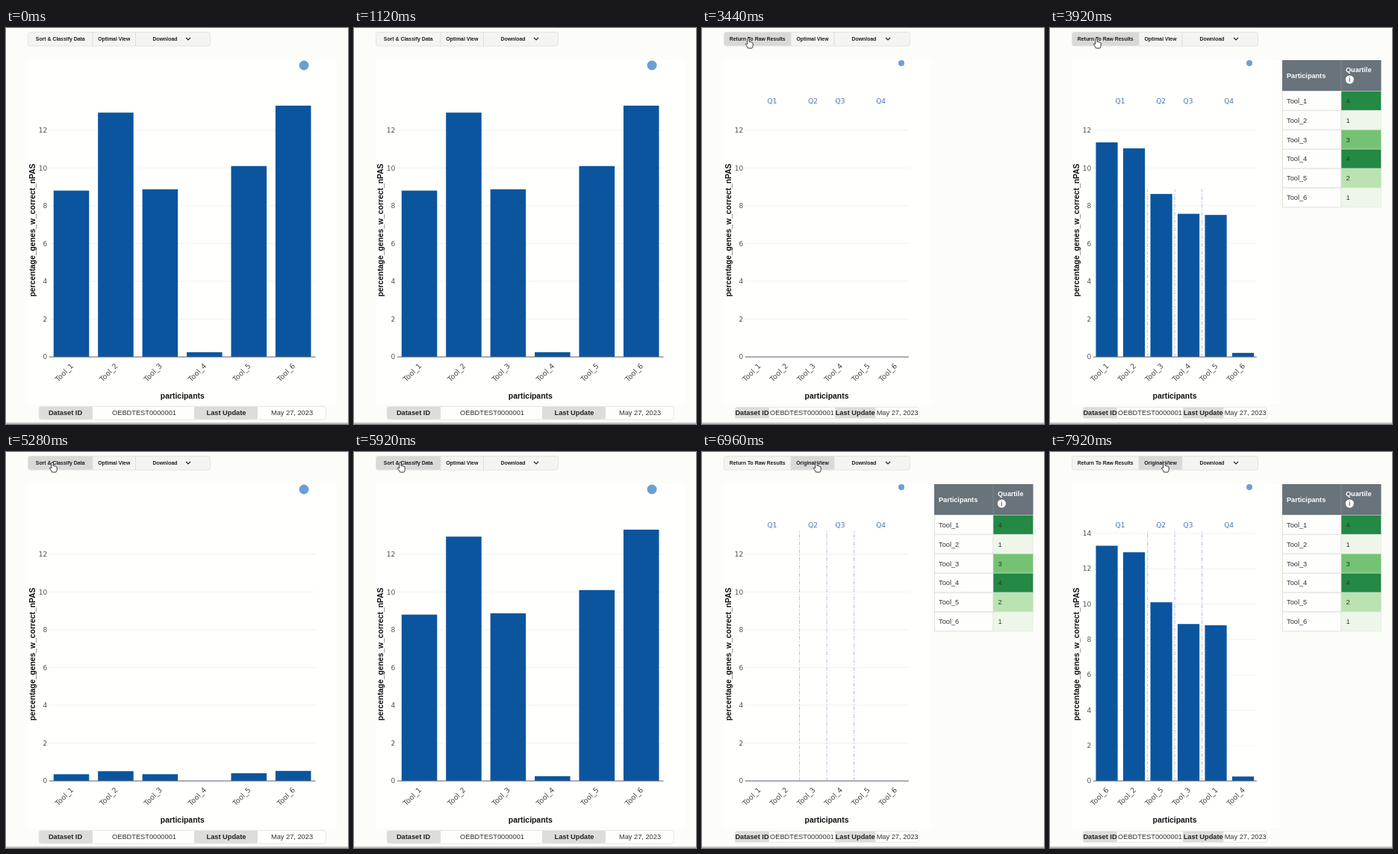
Recreate the animation shown at these times as an HTML page. Size 458 by 530 pixels, loop 8 s.

```html
<!DOCTYPE html>
<html lang="en">
<head>
<meta charset="utf-8">
<title>Benchmark bar plot</title>
<style>
  html, body { margin: 0; width: 100%; height: 100%; overflow: hidden; background: #fcfdf8; }
  svg { display: block; width: 458px; height: 530px; font-family: "Liberation Sans", Arial, sans-serif; }
  .b { font-weight: bold; }
  .m { text-anchor: middle; }
  .plot { font-family: "DejaVu Sans", Verdana, sans-serif; }
</style>
</head>
<body>
<svg id="stage" viewBox="0 0 458 530"></svg>
<script>
const stage = document.getElementById('stage');
const LOOP = 8000, GROW = 500, BASE = 440;
const values = [8.8, 12.93, 8.87, 0.24, 10.1, 13.3];
const quartiles = [4, 1, 3, 4, 2, 1];
const inOrder = [0, 1, 2, 3, 4, 5];
const ranked = [5, 1, 4, 2, 0, 3];
const shades = { 1: '#edf6e8', 2: '#bae3b1', 3: '#74c374', 4: '#238944' };

// Each view: when it is laid out, when its bars start growing.
const views = [
  { at: 0, grow: -GROW, sorted: false },
  { at: 3440, grow: 3587, sorted: true, linesGrow: true },
  { at: 5120, grow: 5174, sorted: false },
  { at: 6000, grow: 6140, sorted: true, linesGrow: true },
  { at: 6900, grow: 6985, sorted: true, optimal: true }
];
const TABLE_DELAY = 80;

const clamp = x => Math.max(0, Math.min(1, x));
const lerp = (a, b, p) => a + (b - a) * p;
const cubicInOut = p => p < .5 ? 4 * p ** 3 : 1 - 4 * (1 - p) ** 3;

const rect = (x, y, w, h, fill, extra = '') =>
  `<rect x="${x}" y="${y}" width="${w}" height="${h}" fill="${fill}" ${extra}/>`;
const line = (x1, y1, x2, y2, color, extra = '') =>
  `<path d="M${x1} ${y1}L${x2} ${y2}" stroke="${color}" fill="none" ${extra}/>`;
const text = (x, y, s, size, cls = '', fill = '#222', extra = '') =>
  `<text x="${x}" y="${y}" font-size="${size}" class="${cls}" fill="${fill}" ${extra}>${s}</text>`;

function toolbar(view, hover) {
  const [a, b, end] = view.sorted ? [119, 177, 279] : [116, 173.5, 274];
  const label = (x, s) => text(x, 17, s, 6.9, 'b m', '#1c1c1c');
  const cx = end - 30;
  let out = rect(29.5, 5.5, end - 30, 18.5, '#f4f4f3', 'rx="3"');
  if (hover === 1) out += rect(29.5, 5.5, a - 29.5, 18.5, '#d9d9d8', 'rx="3"');
  if (hover === 2) out += rect(a, 5.5, b - a, 18.5, '#d9d9d8');
  out += rect(29.5, 5.5, end - 30, 18.5, 'none', 'rx="3" stroke="#e4e4e2"');
  out += line(a, 6, a, 24, '#dededc') + line(b, 6, b, 24, '#dededc');
  out += label((29.5 + a) / 2, view.sorted ? 'Return To Raw Results' : 'Sort &amp; Classify Data');
  out += label((a + b) / 2, view.optimal ? 'Original View' : 'Optimal View');
  out += label(view.sorted ? 217 : 213, 'Download');
  return out + `<path d="M${cx - 3} 13l3 3 3-3" fill="none" stroke="#222" stroke-width="1.2"/>`;
}

function chart(view, t) {
  const p = clamp((t - view.grow) / GROW), done = p === 1;
  const left = 57.8, step = view.sorted ? 36.5 : 59.43, right = left + step * 6;
  const unit = view.optimal && done ? 23.65 : 25.27;
  const topTick = view.optimal && done ? 14 : 12;
  const slots = view.sorted ? ranked : inOrder;
  const names = done ? slots : inOrder;
  let out = rect(29, 43, view.sorted ? 278 : 414, 460, '#fffffe');

  out += '<g class="plot">';
  for (let v = 0; v <= topTick; v += 2) {
    const y = BASE - v * unit;
    if (v) out += line(left, y, right, y, '#f0f0f0');
    out += text(55.3, y + 3.2, v, 9, '', '#505050', 'text-anchor="end"');
  }
  slots.forEach((tool, i) => {
    const h = values[tool] * unit * cubicInOut(p);
    const mid = left + step * (i + .5);
    if (h > .4) out += rect(mid - step * .4, BASE - h, step * .8, h, '#0b559f');
    out += text(0, 0, 'Tool_' + (names[i] + 1), 9.6, '', '#454545',
      `text-anchor="end" transform="translate(${mid + 3.2} 453) rotate(-45)"`);
  });
  out += line(left, BASE + .2, right, BASE + .2, '#5c6068');

  if (view.sorted) {
    const top = lerp(BASE, 104, view.linesGrow ? p : 1);
    for (const n of [2, 3, 4]) {
      const x = left + step * n - .2;
      if (top < BASE) out += line(x, BASE, x, top, '#b3c0e0', 'stroke-dasharray="5 2 1.5 2"');
    }
    [94, 148.7, 185, 239.7].forEach((x, i) => {
      out += text(x, 101, 'Q' + (i + 1), 9, 'm', '#4a75b2');
    });
  }
  out += '</g>';

  out += text(0, 0, 'percentage_genes_w_correct_nPAS', 10.35, 'b m', '#111',
    'transform="translate(38.5 270.5) rotate(-90)"');
  out += text(view.sorted ? 167 : 236.3, 496, 'participants', 10.4, 'b m', '#111');
  const [lx, ly, r] = view.sorted ? [267, 47, 4] : [399, 50, 6.5];
  return out + `<circle cx="${lx}" cy="${ly}" r="${r}" fill="#6ba0d2"/>`;
}

function footer(sorted) {
  const size = 9.25, y = sorted ? 517.7 : 518;
  const cells = sorted
    ? [[44, 46, 67], [178, 54.5, 205.2], 134, 261.7, 247, 507.5, 15]
    : [[44, 72, 79.5], [252, 85, 295], 185, 383, 384.5, 506.5, 17.5];
  const [id, date, idValue, dateValue, width, top, height] = cells;
  let out = rect(44, top, width, height, '#fefefd', 'rx="4"');
  for (const [x, w] of [id, date]) out += rect(x, top, w, height, '#dcddda', 'rx="2"');
  out += rect(44, top, width, height, 'none', 'rx="4" stroke="#e8e9e5"');
  return out + text(id[2], y, 'Dataset ID', size, 'b m') + text(date[2], y, 'Last Update', size, 'b m')
    + text(idValue, y, 'OEBDTEST0000001', size, 'm', '#333')
    + text(dateValue, y, 'May 27, 2023', size, 'm', '#333');
}

function table() {
  let out = rect(311, 43, 132.5, 41.5, '#68737b');
  out += line(390, 43, 390, 84, '#7d878d');
  out += text(317, 67, 'Participants', 9.15, 'b', '#fff') + text(396, 59, 'Quartile', 9.15, 'b', '#fff');
  out += '<circle cx="401.3" cy="69" r="5.6" fill="#fff"/>' + text(401.3, 72.4, 'i', 9, 'b m', '#68737b');
  quartiles.forEach((q, i) => {
    const y = 84.5 + i * 25.9;
    out += rect(311.5, y, 78.5, 25.9, '#fefefd', 'stroke="#dfe1de"');
    out += rect(390, y, 53.5, 25.9, shades[q], 'stroke="#dfe1de" stroke-opacity=".5"');
    out += text(317, y + 16.2, 'Tool_' + (i + 1), 9.25, '', '#333') + text(396.5, y + 16.2, q, 9.25, '', '#2b3a2e');
  });
  return out;
}

function pointer(t) {
  if (t < 2320) return null;
  const enter = cubicInOut(clamp((t - 2280) / 640));
  const move = cubicInOut(clamp((t - 6280) / 440));
  return { x: lerp(lerp(78, 62, enter), 153, move), y: lerp(-10, 13.5, enter) };
}

function hand({ x, y }) {
  return `<path transform="translate(${x} ${y})" d="M-1.2 8V.8Q0-.8 1.2.8V5Q2.4 4.2 3 5.4 4.2 4.8 4.7 6 6.2 5.8 6.2 7.4V10Q6 12 5 13.5H-.5Q-2-.5-1 11L-3.6 8.2Q-3.4 6.4-1.2 8Z"
    fill="#fff" stroke="#222" stroke-width=".9" stroke-linejoin="round"/>`.replace('Q-2-.5-1 11L', 'Q-1.2 11.5-2.4 10L');
}

function hovered(view, cursor) {
  if (!cursor || cursor.y < 5) return 0;
  const edge = view.sorted ? 119 : 116;
  return cursor.x < edge ? 1 : 2;
}

function draw(t) {
  const view = views.filter(v => t >= v.at).pop();
  const cursor = pointer(t);
  const tableShown = view.sorted && (view.optimal || t >= view.at + TABLE_DELAY);
  stage.innerHTML = rect(0, 0, 458, 530, '#fcfdf8')
    + toolbar(view, hovered(view, cursor))
    + chart(view, t)
    + footer(view.sorted)
    + (tableShown ? table() : '')
    + line(0, 529, 458, 529, '#85868a')
    + (cursor ? hand(cursor) : '');
}

const start = performance.now();
function tick() {
  draw((performance.now() - start) % LOOP);
  requestAnimationFrame(tick);
}
tick();
</script>
</body>
</html>
```
